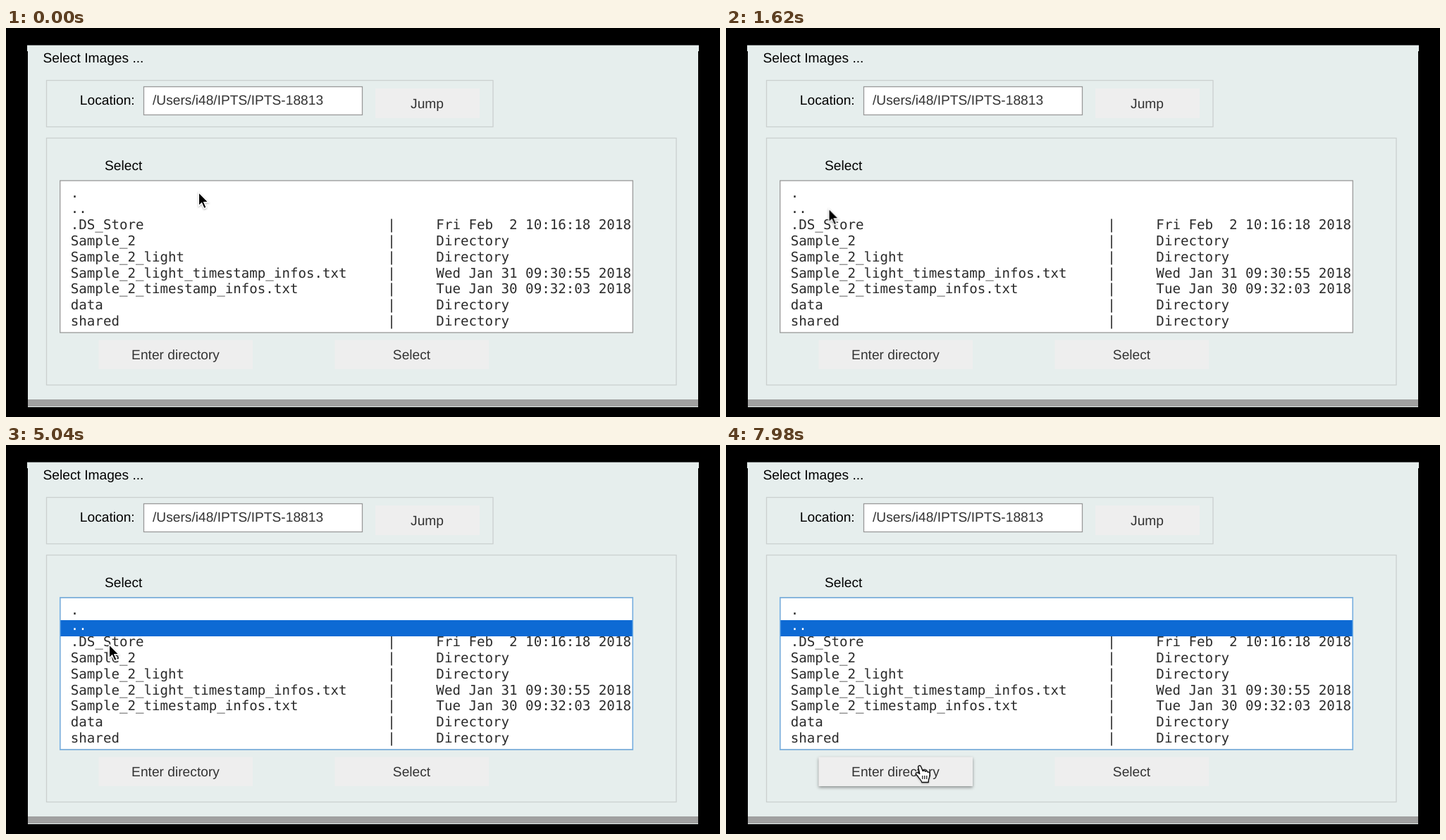
Recreate the animation shown at these times as an HTML page. Size 1013 by 553 pixels, loop 8000 ms.

```html
<!DOCTYPE html>
<html lang="en">
<head>
<meta charset="utf-8">
<title>Select Images</title>
<style>
  html, body { margin: 0; width: 100%; height: 100%; overflow: hidden; background: #000; }
  svg { display: block; width: 1013px; height: 553px; }
  text { font: 19.2px "Liberation Sans", Arial, sans-serif; text-rendering: geometricPrecision; white-space: pre; }
  .mid { text-anchor: middle; }
  .soft { fill: #333; }
  .rows text { font: 19.15px "DejaVu Sans Mono", monospace; fill: #2b2b2b; }
  .group { fill: none; stroke: #cbd0cf; stroke-width: 1.3; }
  .field { fill: #fff; stroke: #999; stroke-width: 1.3; }
  .button { fill: #eee; }

  .focus, .hand, .arrow, .raised { animation: 8s step-end infinite; }
  .focus { animation-name: focus; }
  .hand, .raised { animation-name: enter; }
  .arrow { animation-name: leave; }
  .raised { filter: drop-shadow(0 2px 2px rgba(0, 0, 0, .4)); }
  .pointer { animation: move 8s ease-in-out infinite; }
  .shade { filter: drop-shadow(0 1px 1px rgba(0, 0, 0, .3)); }

  @keyframes focus { 0% { opacity: 0 } 55.5%, 100% { opacity: 1 } }
  @keyframes enter { 0% { opacity: 0 } 88.2%, 100% { opacity: 1 } }
  @keyframes leave { 0% { opacity: 1 } 88.2%, 100% { opacity: 0 } }
  @keyframes move {
    0%, 1.5% { transform: translate(273px, 233px) }
    9.8%, 15.5% { transform: translate(172px, 221px) }
    20.2% { transform: translate(146px, 256px); animation-timing-function: ease-out }
    24.5%, 27.3% { transform: translate(125px, 266px) }
    31%, 59% { transform: translate(121px, 260px) }
    62.5%, 66% { transform: translate(146px, 283px); animation-timing-function: ease-in }
    72% { transform: translate(178px, 335px); animation-timing-function: linear }
    81% { transform: translate(222px, 404px); animation-timing-function: linear }
    85.5% { transform: translate(237px, 425px); animation-timing-function: linear }
    88.2% { transform: translate(254px, 443px); animation-timing-function: ease-out }
    91.8%, 100% { transform: translate(276px, 457px) }
  }
</style>
</head>
<body>
<svg viewBox="0 0 1013 553">
  <path d="M30 24.5H983V33H982V538.5H31V33H30Z" fill="#e6eeed"/>
  <rect x="31" y="528" width="951" height="10" fill="#a0a0a0"/>
  <rect x="31" y="538" width="951" height="1" fill="#e6eeed"/>

  <text x="52.5" y="49">Select Images ...</text>
  <rect class="group" x="57.5" y="74.5" width="633.5" height="66"/>
  <text x="104.8" y="109">Location:</text>
  <rect class="field" x="195.5" y="83.5" width="310" height="40"/>
  <text class="soft" x="208" y="109">/Users/i48/IPTS/IPTS-18813</text>
  <rect class="button" x="524" y="86" width="148" height="42"/>
  <text class="mid soft" x="597.5" y="113.5">Jump</text>

  <rect class="group" x="57.5" y="156.5" width="893.5" height="351"/>
  <text x="140" y="201.5">Select</text>
  <rect class="field" x="76.7" y="217" width="812.6" height="216"/>
  <g class="rows"></g>
  <g class="focus">
    <rect x="77" y="249" width="812" height="23" fill="#0d6ad4"/>
    <g class="rows"><text x="91.8" y="263.3" style="fill:#fff">..</text></g>
    <rect x="76.7" y="217" width="812.6" height="216" fill="none" stroke="#78b4e8" stroke-width="1.5"/>
  </g>

  <rect class="button" x="131.5" y="443.5" width="218.5" height="41.5"/>
  <rect class="button raised" x="131.5" y="443.5" width="218.5" height="41.5"/>
  <text class="mid soft" x="240.5" y="470.5">Enter directory</text>
  <rect class="button" x="466.5" y="443.5" width="218.5" height="41.5"/>
  <text class="mid soft" x="575.5" y="470.5">Select</text>

  <g class="pointer">
    <g class="arrow">
      <path class="shade" d="M.3 .5V20L4.6 16L8 23.8L11.3 22.3L8 14.8H14.3Z" stroke="#fff" stroke-width="1.5"/>
    </g>
    <g class="hand">
      <path class="shade" d="M-3.2 1.2C-3.8-1.4-.2-2.2 .7 .4L3.2 6.5C4.2 5.2 6.4 5.6 6.8 7.2C8 6.1 9.8 6.6 10.2 8.2C11.5 7.4 13 8.3 13.1 10.2C13.3 14 12.4 16.5 11.4 19L11.2 22.5H1.8C1.5 19.5-2 17.5-3.6 14.3C-4.8 12.8-7.2 11.4-6.6 9.6C-5.8 7.9-3.2 8.6-1.2 10.6Z" fill="#fff" stroke="#111" stroke-width="1.4" stroke-linejoin="round"/>
      <path d="M2.8 13V18M5.8 13V18M8.8 13V18" stroke="#111" stroke-width="1.2"/>
    </g>
  </g>
</svg>
<script>
  const files = [
    ['.'], ['..'],
    ['.DS_Store', 'Fri Feb  2 10:16:18 2018'],
    ['Sample_2', 'Directory'],
    ['Sample_2_light', 'Directory'],
    ['Sample_2_light_timestamp_infos.txt', 'Wed Jan 31 09:30:55 2018'],
    ['Sample_2_timestamp_infos.txt', 'Tue Jan 30 09:32:03 2018'],
    ['data', 'Directory'],
    ['shared', 'Directory']
  ];
  const rows = document.querySelector('.rows');
  files.forEach(([name, info], i) => {
    const row = document.createElementNS(rows.namespaceURI, 'text');
    row.setAttribute('x', 91.8);
    row.setAttribute('y', 240.5 + i * 22.8);
    row.textContent = info ? name.padEnd(39) + '|     ' + info : name;
    rows.append(row);
  });
</script>
</body>
</html>
```
